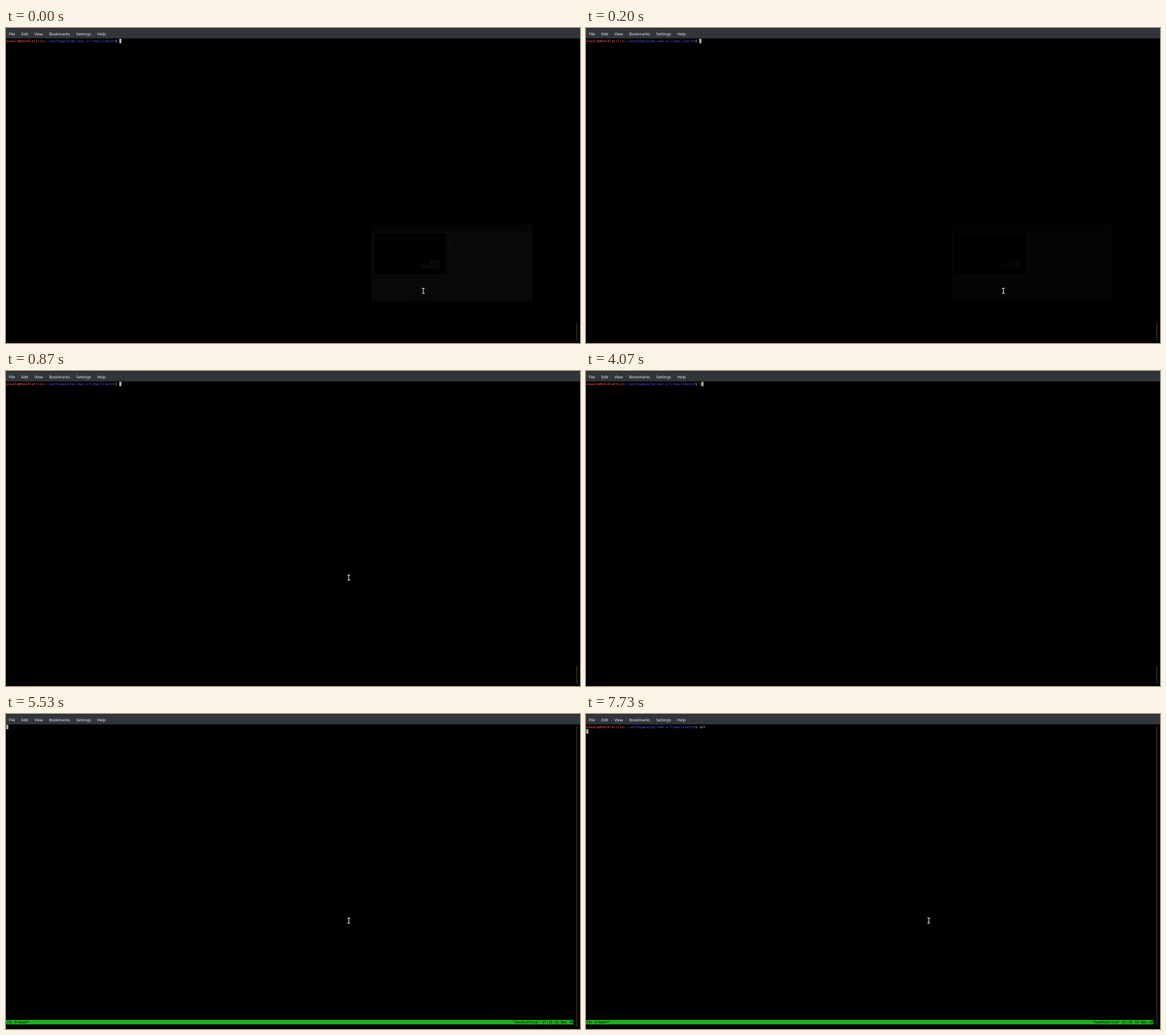
These frames come from a looping animation (1009x555 px, 8000 ms). An HTML page with a canvas:

```html
<!DOCTYPE html>
<html>
<head>
<meta charset="utf-8">
<title>Terminal session</title>
<style>
  html, body { margin: 0; width: 100%; height: 100%; overflow: hidden; background: #000; }
  canvas { display: block; }
</style>
</head>
<body>
<canvas id="stage" width="1009" height="555"></canvas>
<script>
const ctx = document.getElementById('stage').getContext('2d');
const LOOP = 8000, STEP = 1000 / 15;
const CELL = 3.679, ROW = 7.88, LEFT = 0.5, TOP = 18.9, COLS = 271, STATUS_ROW = 66;
const MONO = '6.11px "DejaVu Sans Mono", monospace';
const SANS = '6.83px "Noto Sans", sans-serif';
const RED = '#ff5454', BLUE = '#5454ff', GREY = '#b2b2b2', GREEN = '#18b218';

const USER = 'oswald', HOST = 'hex4lattice';
const PROMPT = [[USER + '@' + HOST, RED], [':', GREY],
  ['~/workspace/my-own-x/l/mailinator', BLUE], ['$ ', GREY]];
const MENU = [['File', 5], ['Edit', 27], ['View', 50], ['Bookmarks', 76], ['Settings', 123.5], ['Help', 160.3]];

// [start time, typed text]
const SHELL_KEYS = [[0, ''], [4070, 't'], [4270, 'tm'], [4470, 'tmu'], [4670, 'tmux'], [5130, 'tmu'], [5270, 'tmux']];
const TMUX_KEYS = [[6070, ''], [7000, 's'], [7070, 'sb'], [7270, 'sbt']];
const ENTER_SHELL = 5470, TMUX_START = 5530, TMUX_PROMPT = 6070, ENTER_TMUX = 7730;

function rect(x, y, w, h, color) {
  ctx.fillStyle = color;
  ctx.fillRect(x, y, w, h);
}

function text(str, x, y, font, color, align = 'left') {
  ctx.font = font;
  ctx.fillStyle = color;
  ctx.textAlign = align;
  ctx.fillText(str, x, y);
}

function cells(str, col, row, color) {
  text(str, LEFT + col * CELL, TOP + row * ROW + 6.2, MONO, color);
}

function cursor(col, row) {
  rect(LEFT + col * CELL, TOP + row * ROW, CELL, ROW, GREY);
}

function promptLine(typed) {
  let col = 0;
  for (const [part, color] of [...PROMPT, [typed, GREY]]) {
    cells(part, col, 0, color);
    col += part.length;
  }
  return col;
}

function typedAt(keys, t) {
  return keys.filter(([start]) => t >= start).pop()[1];
}

function menuBar() {
  rect(0, 0, 1009, 18.3, '#31363b');
  rect(0, 0, 1009, 1.6, '#2b2f33');
  for (const [label, x] of MENU) text(label, x, 13.2, SANS, '#eff0f1');
}

function scrollBar(top) {
  rect(1003, top, 1, 551 - top, '#4b4c42');
}

// Drawn solid, then veiled with black so that it fades towards the empty terminal.
function recorderDialog(opacity) {
  if (opacity <= 0) return;
  const body = '#34383f', ink = '#14161a';
  const label = (str, x, y, align) => text(str, x, y, SANS, ink, align);
  rect(642, 344, 284, 13, '#15171a');
  rect(642, 357, 284, 124, body);
  text('recordMyDesktop', 785, 352, SANS, '#25292c', 'center');
  ctx.beginPath();
  ctx.arc(919, 349, 4.5, 0, 7);
  ctx.fillStyle = body;
  ctx.fill();
  rect(648, 362, 125.5, 71, '#000');
  rect(728, 408, 35, 16, body);
  rect(729, 409, 15, 8, '#000');
  label('Video Quality', 843, 370, 'right');
  label('Sound Quality', 845, 382, 'right');
  rect(786, 377, 6, 6, ink);
  for (const y of [367.5, 379.5]) rect(848, y, 64, 1, ink);
  label('Advanced', 852, 397, 'center');
  label('Left click and drag on the preview image', 783, 425.5);
  label('to select an area for recording.', 783, 435.5);
  label('Right click on it to reset the area.', 783, 445.5);
  rect(708, 461, 38, 13, '#1c343c');
  label('Select Window', 652, 470);
  label('Record', 717, 470);
  label('Save As', 855, 470);
  label('Quit', 902, 470);
  rect(642, 344, 284, 137, `rgba(0, 0, 0, ${1 - opacity})`);
}

function pointer(t) {
  if (t >= 4070 && t < 4270) return;
  const u = Math.min(1, Math.max(0, (t - 330) / 540));
  const ease = u * u * (3 - 2 * u);
  ctx.save();
  ctx.translate(Math.round(733 - 131 * ease), Math.round(463 - 99 * ease));
  rect(-3, -6, 7, 3, '#000');
  rect(-3, 3, 7, 3, '#000');
  rect(-1, -5, 3, 10, '#000');
  rect(-2, -5, 5, 1.2, '#e4e4e4');
  rect(-2, 3.8, 5, 1.2, '#e4e4e4');
  rect(0, -5, 1.2, 10, '#e4e4e4');
  ctx.restore();
}

function statusBar() {
  const clock = `"${HOST}" 17:15 15-Dec-18`;
  rect(0, TOP + STATUS_ROW * ROW, LEFT + COLS * CELL, ROW, GREEN);
  cells('[0] 0:bash*', 0, STATUS_ROW, '#000');
  cells(clock, COLS - clock.length, STATUS_ROW, '#000');
}

function shell(t) {
  const end = promptLine(typedAt(SHELL_KEYS, t));
  if (t < ENTER_SHELL) cursor(end, 0);
  else cursor(0, 1);
}

function tmux(t) {
  statusBar();
  if (t < TMUX_PROMPT) return cursor(0, 0);
  const end = promptLine(typedAt(TMUX_KEYS, t));
  if (t < ENTER_TMUX) cursor(end, 0);
  else cursor(0, 1);
}

function draw(t) {
  rect(0, 0, 1009, 555, '#000');
  menuBar();
  const inTmux = t >= TMUX_START;
  scrollBar(inTmux ? 22 : 520);
  (inTmux ? tmux : shell)(t);
  const stepped = Math.floor((t + 4) / STEP) * STEP;
  recorderDialog(0.17 * (1 - stepped / 425));
  pointer(t < 1000 ? stepped : t);
}

ctx.textRendering = 'geometricPrecision';
const began = performance.now();
function frame() {
  draw((performance.now() - began) % LOOP);
  requestAnimationFrame(frame);
}
frame();
</script>
</body>
</html>
```
